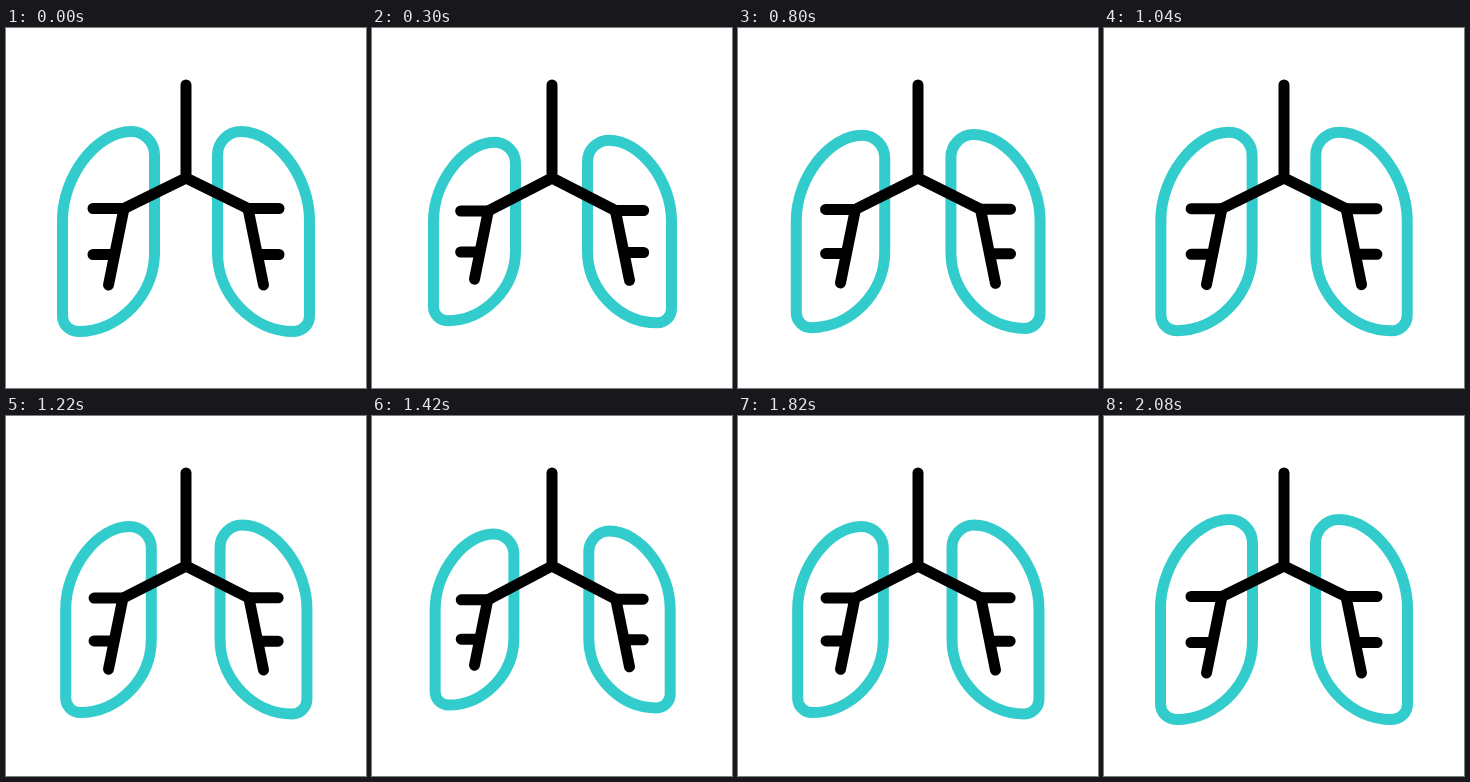
These frames come from a looping animation (360 by 360 pixels, 2400 ms). An HTML page:

```html
<!DOCTYPE html>
<html lang="en">
<head>
<meta charset="utf-8">
<title>Breathing lungs</title>
<style>
  html, body { margin: 0; height: 100%; overflow: hidden; background: #fff; }
  svg { display: block; width: 100vw; height: 100vh; fill: none; stroke-width: 11; stroke-linecap: round; stroke-linejoin: round; }
  path { vector-effect: non-scaling-stroke; }
  .lobe { stroke: #33cccc; }
  .airway, #trunk { stroke: #000; }
</style>
</head>
<body>
<svg viewBox="0 0 360 360">
  <path class="lobe"/>
  <path class="lobe"/>
  <path class="airway"/>
  <path class="airway"/>
  <path id="trunk"/>
</svg>
<script>
const LOOP = 2400, FIRST = 960, END = 2080;
// Shapes are relative to the lung centre; the right lung is mirrored.
const LOBE = 'M22.5-100A23.5 23.5 0 0 1 46-76.5V21.5C46 63.5 11 100-30.5 100A15.5 15.5 0 0 1-46 84.5V-11.5C-46-55-12-100 22.5-100Z';
const AIRWAY = 'M-15.5-23H15.5L0 53.5M-15.5 23H6';
const CENTRE = { x: 77.5, y: 203.5 };
const NODE = { x: 15.5, y: -23 };
const sides = [{ dir: 1, depth: 0.156 }, { dir: -1, depth: 0.125 }];

const lobes = document.querySelectorAll('.lobe');
const airways = document.querySelectorAll('.airway');
const trunk = document.getElementById('trunk');
lobes.forEach(p => p.setAttribute('d', LOBE));
airways.forEach(p => p.setAttribute('d', AIRWAY));

// 0 = full lungs, 1 = fully exhaled; two breaths, then a rest
function exhale(t) {
  if (t >= END) return 0;
  const phase = t < FIRST ? t / FIRST : (t - FIRST) / (END - FIRST);
  return (1 - Math.cos(2 * Math.PI * phase)) / 2;
}

function draw(now) {
  const e = exhale(now % LOOP);
  const nodes = sides.map(({ dir, depth }, i) => {
    const s = 1 - depth * e;
    const cx = 180 - dir * CENTRE.x;
    const move = `translate(${cx} ${CENTRE.y}) scale(${dir * s} ${s})`;
    lobes[i].setAttribute('transform', move);
    airways[i].setAttribute('transform', move);
    return `${cx + dir * s * NODE.x} ${CENTRE.y + s * NODE.y}`;
  });
  trunk.setAttribute('d', `M180 57V150M${nodes[0]}L180 150L${nodes[1]}`);
  requestAnimationFrame(draw);
}
draw(performance.now());
</script>
</body>
</html>
```
